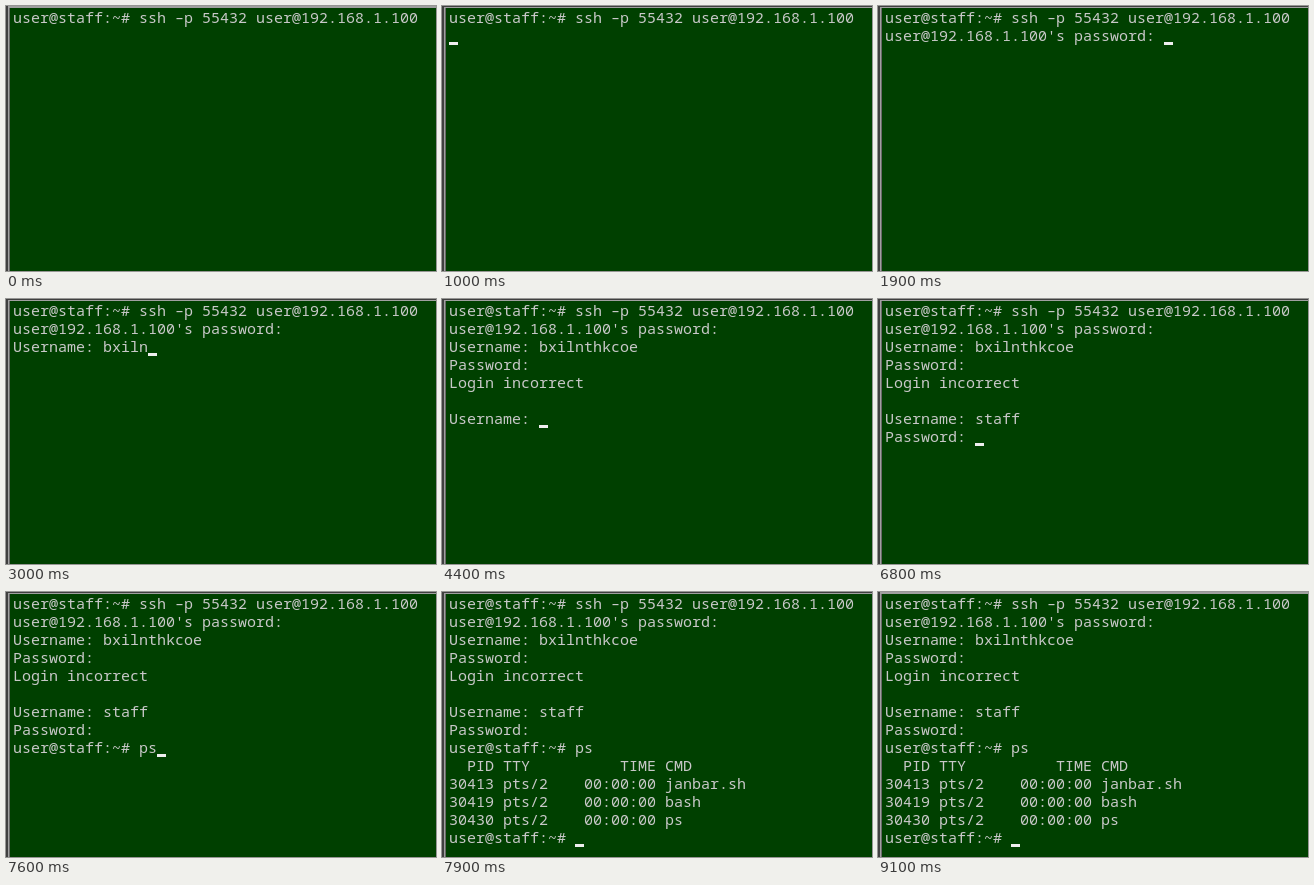
Animation of 430x265 px, one loop 9200 ms. Source, as an HTML page:

```html
<!DOCTYPE html>
<html lang="en">
<head>
<meta charset="utf-8">
<title>Terminal session</title>
<style>
  html, body { margin: 0; width: 100%; height: 100%; overflow: hidden; background: #404040; }
  #stage { position: relative; width: 100%; height: 100%; overflow: hidden; }
  #window {
    position: absolute; inset: 0 0 0 2px; background: #004000;
    box-shadow: inset 1px 0 #a0a0a0, inset 0 2px #a0a0a0, inset 2px 0 #696969;
  }
  #edge { position: absolute; inset: 0 0 auto 2px; height: 1px; background: #404040; }
  #screen {
    position: absolute; left: 7px; top: 2px; margin: 0;
    font: 15px/18px "Noto Sans Mono", monospace;
    font-variant-ligatures: none; color: #c8c8c8;
  }
  #cursor { position: absolute; width: 9px; height: 3px; background: #eee; }
</style>
</head>
<body>
<div id="stage">
  <div id="window"></div>
  <div id="edge"></div>
  <pre id="screen"></pre>
  <div id="cursor"></div>
</div>
<script>
const LOOP = 9200, CELL_W = 9, CELL_H = 18, LEFT = 7, FIRST_UNDERLINE = 18;
const EDGE_DARK = 400, EDGE_LIGHT = 9100;
const PROMPT = 'user@staff:~# ';
const PROCESSES = [
  '  PID TTY          TIME CMD',
  '30413 pts/2    00:00:00 janbar.sh',
  '30419 pts/2    00:00:00 bash',
  '30430 pts/2    00:00:00 ps',
].join('\n');

// [time in ms, text added, cursor visible]
const STEPS = [
  [0, PROMPT + 'ssh –p 55432 user@192.168.1.100', false],
  [400, '', true],
  [900, '', false],
  [1000, '\n', true],
  [1100, "user@192.168.1.100's password: ", true],
  [1400, '', false],
  [1900, '', true],
  [2400, '\n', true],
  [2500, 'Username: ', true],
  [3000, 'bxiln', true],
  [3100, 'thk', true],
  [3200, 'coe', true],
  [3400, '\nPassword: ', true],
  [4300, '', false],
  [4400, '\nLogin incorrect\n\nUsername: ', true],
  [5200, 's', true],
  [5300, 't', true],
  [5400, 'a', true],
  [5600, 'f', true],
  [5700, 'f', true],
  [5900, '\nPassword: ', true],
  [6300, '', false],
  [6800, '', true],
  [7000, '\n' + PROMPT, true],
  [7200, '', false],
  [7600, 'ps', true],
  [7900, '\n' + PROCESSES + '\n' + PROMPT, true],
  [8200, '', false],
  [8700, '', true],
];

const [edgeEl, screenEl, cursorEl] =
  ['edge', 'screen', 'cursor'].map(id => document.getElementById(id));
let shown = -1;

function render(count) {
  const text = STEPS.slice(0, count).map(step => step[1]).join('');
  const lines = text.split('\n');
  screenEl.textContent = text;
  cursorEl.style.left = LEFT + lines.at(-1).length * CELL_W + 'px';
  cursorEl.style.top = FIRST_UNDERLINE + (lines.length - 1) * CELL_H + 'px';
  cursorEl.hidden = !STEPS[count - 1][2];
}

function tick() {
  const time = performance.now() % LOOP;
  const count = STEPS.filter(step => step[0] <= time).length;
  if (count !== shown) render(shown = count);
  edgeEl.hidden = time < EDGE_DARK || time >= EDGE_LIGHT;
  requestAnimationFrame(tick);
}
tick();
</script>
</body>
</html>
```
